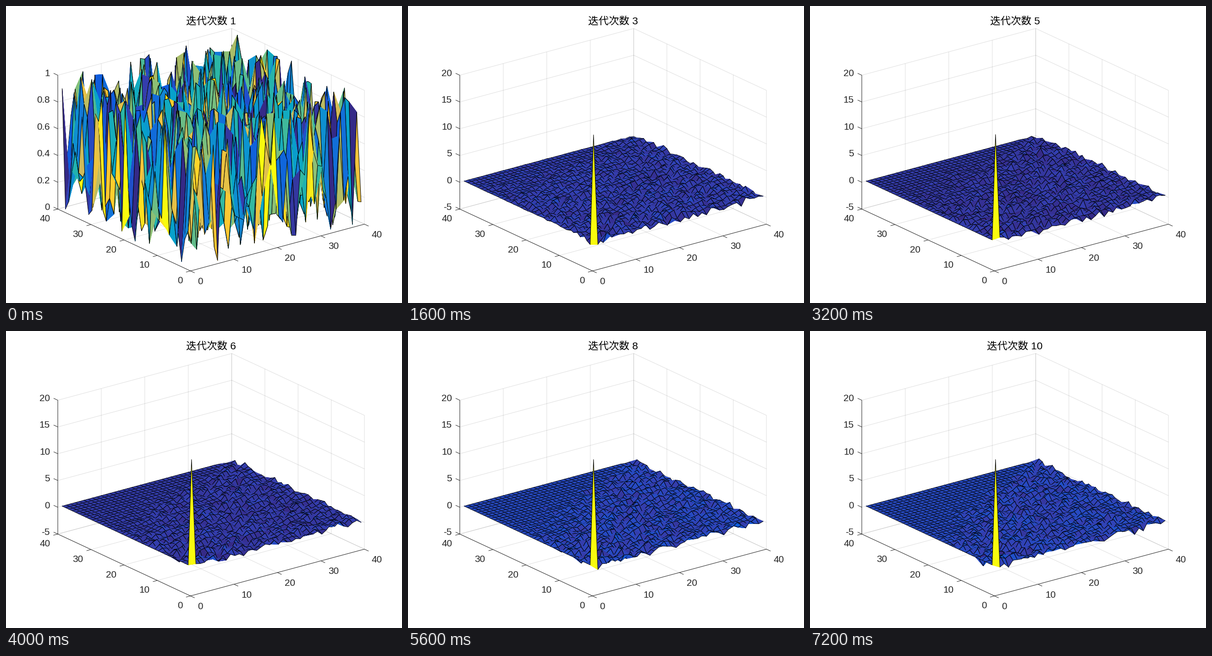
Write a matplotlib script that moves like this. It is 864x648 px and loops after 8 s.

```python
import numpy as np
import matplotlib.pyplot as plt
from matplotlib.animation import FuncAnimation
from matplotlib.collections import LineCollection, PolyCollection
from matplotlib.colors import LinearSegmentedColormap

W, H, DPI = 864, 648, 100
N = 40
STEPS = 10
PEAK = 20  # dominant eigenvalue
FLOOR = -4.8
INK = (0.15, 0.15, 0.15)
PX = 72 / DPI  # points per pixel
FONT = 20.8 * PX
DIGIT = 7.5  # half the height of a digit

# Screen position of the front corner, and the screen vector of each unit
ORIGIN = np.array([402.5, 578.0])
EX = np.array([379.5, -102.0]) / 40
EY = np.array([-289.5, -135.0]) / 40
EZ = np.array([0.0, -292.0])  # full height of the z axis

PARULA = ["#352a87", "#0f5cdd", "#1481d6", "#06a4ca", "#2eb7a4",
          "#87bf77", "#d1bb59", "#fec832", "#f9fb0e"]
stops = list(zip(np.linspace(0, 1, len(PARULA)), PARULA))
stops.insert(1, (0.055, "#3440b3"))  # keeps the dark end purple
cmap = LinearSegmentedColormap.from_list("parula", stops, N=64)


def iterate_qr():
    """Unshifted QR iteration; returns the matrix of every step."""
    a = np.random.default_rng(7).random((N, N))
    a *= PEAK / np.abs(np.linalg.eigvals(a)).max()
    out = [a]
    # Columns of Q are free up to sign: let the first row alternate in pairs
    wanted = np.where(np.arange(N) % 4 % 3 == 0, 1, -1)
    for _ in range(STEPS - 1):
        q, r = np.linalg.qr(a)
        a = r @ q
        flip = wanted * np.where(a[0] < 0, -1, 1)
        a = a * np.outer(flip, flip) if len(out) == 1 else a
        out.append(a)
    return [np.clip(m, FLOOR, PEAK) for m in out]


def project(x, y, h):
    """Screen point for x, y in data units and h as a share of the z axis."""
    x, y, h = (np.asarray(v, float)[..., None] for v in (x, y, h))
    return ORIGIN + x * EX + y * EY + h * EZ


def surface(z, z0, z1):
    """Triangles from back to front with their fill and edge colours."""
    y, x = np.mgrid[1:N + 1, 1:N + 1]
    p = project(x, y, (z - z0) / (z1 - z0))
    a, b, c, d = p[:-1, :-1], p[:-1, 1:], p[1:, 1:], p[1:, :-1]
    # Open paths: the fill closes along the diagonal, the stroke does not
    far = np.stack([b, c, d], axis=2)
    seam = np.stack([b, d, b], axis=2)
    near = np.stack([b, a, d], axis=2)
    verts = np.stack([far, seam, near], axis=2)[::-1, ::-1]

    fill = cmap((z[:-1, :-1] - z.min()) / np.ptp(z))
    fill = np.repeat(fill[:, :, None], 3, axis=2)[::-1, ::-1]
    edge = np.zeros_like(fill)
    edge[..., 3] = 1
    edge[:, :, 1] = fill[:, :, 1]
    return verts.reshape(-1, 3, 2), fill.reshape(-1, 4), edge.reshape(-1, 4)


def add_lines(lines, alpha, order):
    ax.add_collection(LineCollection(lines, colors=[(*INK, alpha)],
                                     linewidths=PX, zorder=order))


def label(x, y, text, ha):
    return ax.text(x, y + DIGIT, text, ha=ha, va="baseline", color=INK,
                   family="Liberation Sans", size=FONT, zorder=4)


def draw_box():
    """Grid, axes and ticks; returns the z labels, which change later."""
    ticks = range(0, 41, 10)
    heights = np.linspace(0, 1, 6)
    grid = []
    for t in ticks:
        grid += [project([t, t, t], [0, 40, 40], [0, 0, 1]),
                 project([0, 40, 40], [t, t, t], [0, 0, 1])]
    for h in heights:
        grid.append(project([0, 40, 40], [40, 40, 0], [h, h, h]))
    add_lines(grid, .15, 1)

    axes = [project([0, 0, 0, 40], [40, 40, 0, 0], [1, 0, 0, 0])]
    ux, uy = (10 * e / np.hypot(*e) for e in (EX, EY))
    for t in ticks:
        px, py = project(t, 0, 0), project(0, t, 0)
        axes += [[px, px - uy], [py, py - ux]]
        label(px[0] + 16, px[1] + 21.5, str(t), "left")
        label(py[0] - 17, py[1] + 19.5, str(t), "right")
    z_labels = []
    for h in heights:
        pz = project(0, 40, h)
        axes.append([pz, pz + uy])
        z_labels.append(label(pz[0] - 17, pz[1] - 5.5, "", "right"))
    add_lines(axes, 1, 2)
    return z_labels


fig = plt.figure(figsize=(W / DPI, H / DPI), dpi=DPI, facecolor="white")
ax = fig.add_axes([0, 0, 1, 1])
ax.set_xlim(0, W)
ax.set_ylim(H, 0)
ax.axis("off")

z_labels = draw_box()
title = ax.text(447, 31.5, "", ha="center", va="center_baseline",
                color="black", size=22.5 * PX, zorder=4,
                family=["Liberation Sans", "Noto Sans CJK JP"])
mesh = PolyCollection([], closed=False, linewidths=PX, zorder=3,
                      joinstyle="bevel", capstyle="round")
ax.add_collection(mesh, autolim=False)
matrices = iterate_qr()


def update(k):
    z0, z1 = (0, 1) if k == 0 else (-5, 20)
    verts, fill, edge = surface(matrices[k], z0, z1)
    mesh.set_verts(verts, closed=False)
    mesh.set_facecolor(fill)
    mesh.set_edgecolor(edge)
    for text, value in zip(z_labels, np.linspace(z0, z1, len(z_labels))):
        text.set_text(f"{value:.2g}")
    title.set_text(f"迭代次数 {k + 1}")
    return [mesh, title, *z_labels]


anim = FuncAnimation(fig, update, frames=STEPS, interval=800, repeat=True)
plt.show()
```
